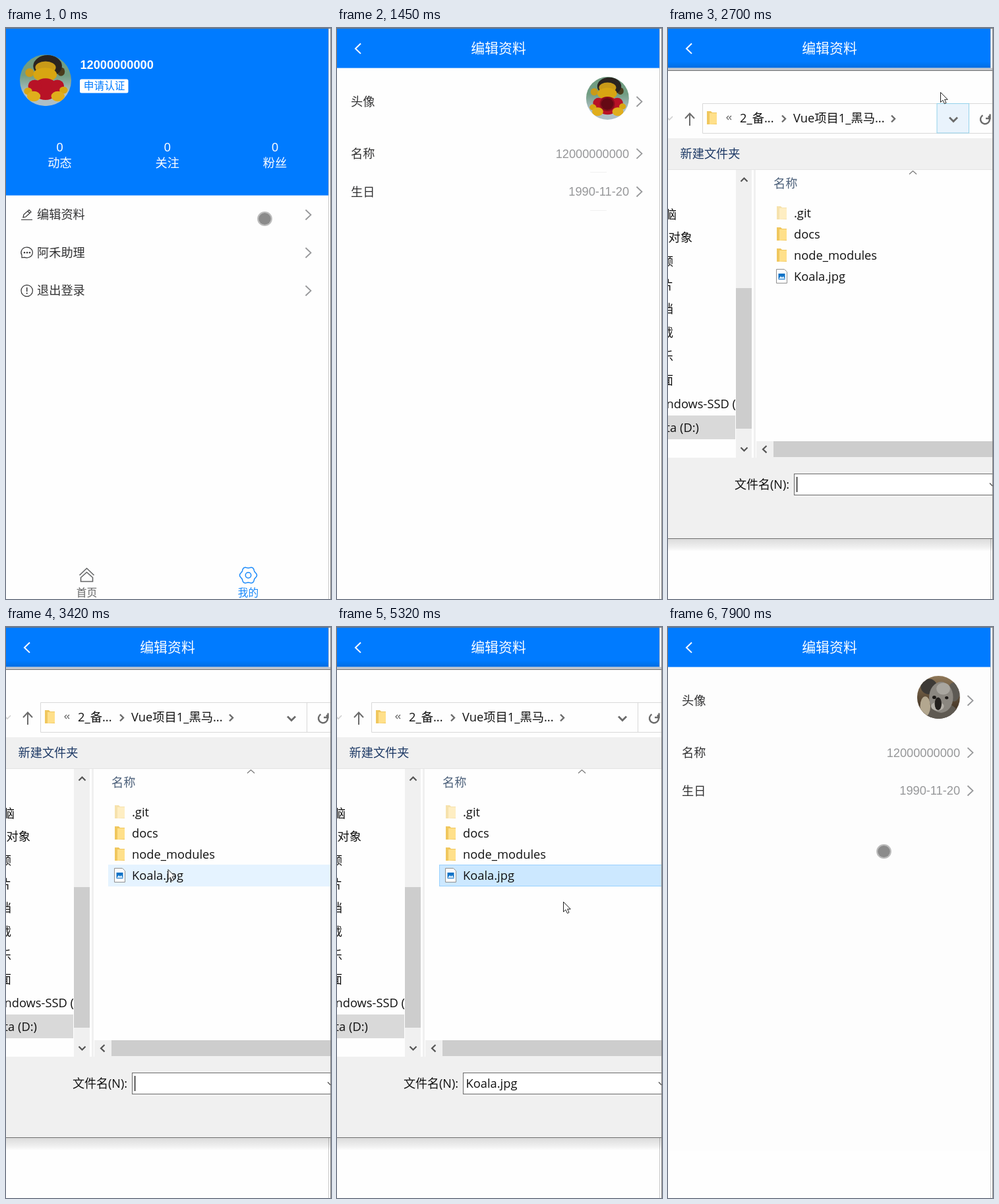
Recreate the animation shown at these times as an HTML page. Size 493x865 px, loop 8 s.

```html
<!DOCTYPE html>
<html lang="zh-CN">
<head>
<meta charset="utf-8">
<title>编辑资料</title>
<style>
html, body { margin: 0; width: 100%; height: 100%; overflow: hidden; background: #fefefe; }
svg { display: block; width: 493px; height: 865px; }
text { font-family: "Liberation Sans", "Noto Sans CJK SC", "Noto Sans CJK", sans-serif; font-size: 18.2px; fill: #323233; white-space: pre; }
.win text { font-family: "Open Sans", "Noto Sans CJK SC", "Noto Sans CJK", sans-serif; font-size: 18.3px; fill: #111; }
</style>
</head>
<body>
<svg id="stage" viewBox="0 0 493 865" xmlns="http://www.w3.org/2000/svg"></svg>
<script>
const LOOP = 8000;
const BLUE = '#007bff';

// markup helpers
const text = (x, y, s, style = '', anchor = 'start') =>
  `<text x="${x}" y="${y}" text-anchor="${anchor}" style="${style}">${s}</text>`;
const rect = (x, y, w, h, fill, extra = '') =>
  `<rect x="${x}" y="${y}" width="${w}" height="${h}" fill="${fill}" ${extra}/>`;
const line = (d, color, width = 1.5, extra = '') =>
  `<path d="${d}" fill="none" stroke="${color}" stroke-width="${width}" ${extra}/>`;
const oval = (x, y, rx, ry, fill) =>
  `<ellipse cx="${x}" cy="${y}" rx="${rx}" ry="${ry}" fill="${fill}"/>`;
const ring = (x, y, r, color, width = 1.3) =>
  `<circle cx="${x}" cy="${y}" r="${r}" fill="none" stroke="${color}" stroke-width="${width}"/>`;
const group = (id, body, extra = '') => `<g id="${id}" ${extra}>${body}</g>`;
const next = y => line(`M454.5 ${y - 7.5}l8 7.5l-8 7.5`, '#969799', 1.75);

// round photos, drawn in a unit circle
const photo = (x, y, r, body) =>
  `<g transform="translate(${x} ${y}) scale(${r})"><g clip-path="url(#round)">${body}</g></g>`;
const toy = (x, y, r) => photo(x, y, r,
  rect(-1, -1, 2, 2, 'url(#toyBg)') +
  oval(-.62, -.3, .17, .17, '#c99a18') + oval(.6, -.34, .15, .17, '#4a3c1c') +
  oval(.08, -.56, .56, .42, '#2a2420') +
  oval(0, -.5, .4, .24, '#c99a18') + oval(-.02, -.22, .46, .27, '#d8a612') +
  oval(0, .34, .5, .42, '#b81226') + oval(-.42, .22, .26, .24, '#b81226') + oval(.46, .22, .26, .24, '#b81226') +
  oval(-.68, .42, .16, .14, '#d8a612') + oval(.7, .38, .16, .14, '#d8a612') +
  oval(-.46, .62, .26, .2, '#e0ae1c') + oval(.48, .62, .26, .2, '#e0ae1c'));
const koala = (x, y, r) => photo(x, y, r,
  rect(-1, -1, 2, 2, 'url(#koalaBg)') +
  oval(-.45, -.5, .38, .36, '#3d3a36') + oval(.72, -.25, .28, .44, '#5d5a54') +
  oval(.1, .75, .8, .5, '#5f5a52') + oval(.12, 0, .56, .72, '#8b8780') +
  oval(.22, -.4, .32, .28, '#a9a69f') + oval(-.62, .42, .24, .46, '#b3a78f') +
  oval(-.05, .42, .3, .2, '#b5b1a9') + oval(-.2, 0, .09, .08, '#1d1a17') +
  oval(.38, .02, .08, .07, '#1d1a17') + oval(-.02, .3, .16, .3, '#23201d'));

const stat = (x, name) =>
  text(x, 187, '0', 'fill:#fff', 'middle') + text(x, 211, name, 'fill:#fff', 'middle');

function gear(cx, cy) {
  let d = '';
  for (let i = 0; i <= 96; i++) {
    const a = i / 96 * Math.PI * 2, r = 12 + Math.cos(6 * a);
    d += `${i ? 'L' : 'M'}${(cx + r * Math.cos(a)).toFixed(2)} ${(cy + r * Math.sin(a)).toFixed(2)}`;
  }
  return line(d + 'Z', '#1989fa', 1.5) + ring(cx, cy, 4.2, '#1989fa', 1.5);
}

const profile = rect(0, 0, 489, 253.6, BLUE) + toy(60, 79.3, 39) +
  text(112.5, 62, '12000000000', 'fill:#fff;font-weight:700') +
  rect(112, 77.5, 73.5, 21, '#fff', 'rx="2.5"') +
  text(117.8, 93.4, '申请认证', `fill:${BLUE};font-size:15.7px`) +
  stat(81.5, '动态') + stat(244.7, '关注') + stat(408, '粉丝') +
  line('M23 290.5H40M26 287l1-4.5l8-7l3 3.2l-8 7.3zM33 277.5l3 3', '#323233', 1.2) +
  line('M24 347.8V344A8.7 8 0 1 1 28 347.4Z', '#323233', 1.2) +
  [28, 32, 36].map(x => oval(x, 340.3, 1.2, 1.2, '#323233')).join('') +
  ring(31.7, 398, 8.7, '#323233', 1.2) + line('M31.7 393v6.5M31.7 401v2', '#323233', 1.5) +
  ['编辑资料', '阿禾助理', '退出登录'].map((s, i) =>
    text(47, 289.3 + 57.5 * i, s) + next(283 + 57.5 * i)).join('') +
  line('M111.5 829l11-10.5l11 10.5M113.5 838.5v-6l9-8l9 8v6z', '#646566', 1.6) +
  text(122.5, 860.5, '首页', 'fill:#646566;font-size:15.7px', 'middle') +
  gear(367.5, 829) +
  text(367.5, 860.5, '我的', 'fill:#1989fa;font-size:15.7px', 'middle');

const field = (y, name, value) =>
  text(21, y + 6.6, name) + text(443, y + 6.4, value, 'fill:#969799', 'end') + next(y);

const edit = rect(0, 0, 489, 60.6, BLUE) + line('M36 23.5l-8 7.7l8 7.7', '#fff', 2) +
  text(245, 38, '编辑资料', 'fill:#fff;font-size:20.9px;font-weight:500', 'middle') +
  group('after', rect(0, 61, 489, 733, '#fdfdfd')) +
  group('press', rect(0, 60.6, 489, 79.4, '#f2f3f5')) +
  group('trace', rect(384, 218, 25, 1, '#f1f1f1') + rect(384, 276, 25, 1, '#f1f1f1')) +
  field(111.5, '头像', '') + field(190.3, '名称', '12000000000') + field(248, '生日', '1990-11-20') +
  group('oldPic', toy(410.4, 106.5, 32.5)) + group('newPic', koala(410.4, 106.5, 32.5));

const folder = (x, y, alpha = 1) => `<g transform="translate(${x} ${y})" opacity="${alpha}">` +
  `<path d="M0 0h6l2 2h7v18h-15z" fill="#f0c75e"/><path d="M4 3h11v16l-11 1z" fill="#ffe08a"/></g>`;
const picture = (x, y) => `<g transform="translate(${x} ${y})">` +
  `<path d="M.5 .5h12l4 4v17h-16z" fill="#fff" stroke="#8f8f8f"/>` +
  rect(3.5, 7, 10, 9, '#1173c7') + `<path d="M4 15l3-4l2 2l2-2l2 4z" fill="#d8ecfb"/></g>`;

const places = ['此电脑', '3D 对象', '视频', '图片', '文档', '下载', '音乐', '桌面', 'Windows-SSD (', 'Data (D:)'];
const placeEnd = { 0: 13, 1: 37, 8: 103, 9: 47 };
const files = ['.git', 'docs', 'node_modules', 'Koala.jpg'];

const dialog =
  rect(0, 51, 489, 9.6, 'url(#fadeTop)') + rect(0, 60.6, 493, 4, '#c3c6cc') +
  rect(0, 774, 493, 19, 'url(#fadeBottom)') +
  rect(0, 64, 493, 710, '#6f6f6f') + rect(0, 65, 493, 708, '#fefefe') +
  // address bar
  line('M-3 134l5 5l5-5', '#cfcfcf', 1.6) + line('M33 148v-18M26 137l7-7.5l7 7.5', '#6b6b6b', 2) +
  line('M500 114.5H52.5V159.5H500M456.5 114.5V159.5', '#d9d9d9', 1) +
  folder(59, 126) + line('M92 133l-3 3l3 3M96 133l-3 3l3 3', '#666', 1.3) +
  text(109, 143, '2_备...') + line('M173 132.5l5 5l-5 5', '#6b6b6b', 2.4) +
  text(190, 143, 'Vue项目1_黑马...') + line('M339 132.5l5 5l-5 5', '#6b6b6b', 2.4) +
  group('drop', rect(408, 114.5, 48.5, 44.5, '#e9f3fc', 'stroke="#94d2ea"')) +
  line('M427 135.5l6 6l6-6', '#6b6b6b', 2.8) +
  line('M477.5 132.2A7 7 0 1 0 486 133.4M488.5 130.5v6.5h-6.5', '#6b6b6b', 2.4) +
  // command bar
  rect(0, 167, 493, 47, '#f0f0f0') + rect(0, 214, 493, 1, '#e4e4e4') +
  text(18.5, 196.5, '新建文件夹', 'fill:#1e3a66;font-size:18.2px') +
  // side list
  rect(0, 587, 102, 36, '#d9d9d9') +
  places.map((s, i) => text(placeEnd[i] ?? 8, 288.5 + 35.95 * i, s, '', 'end')).join('') +
  rect(103, 215, 24, 436, '#f0f0f0') + rect(103, 394, 24, 213, '#cdcdcd') +
  rect(130, 215, 3, 436, '#f0f0f0') +
  line('M110.5 232.5l5-5l5 5M110.5 635.5l5 5l5-5', '#555', 2.2) +
  // file list
  text(160, 242.3, '名称', 'fill:#4c607a;font-size:18.2px') + line('M366 221.5l5.5-5l5.5 5', '#777', 1.2) +
  group('hover', rect(155, 0, 338, 33, '#e5f3ff')) +
  group('chosen', rect(155.5, 360.5, 345, 32, '#cce8ff', 'stroke="#99d1ff"')) +
  files.map((s, i) => text(191, 287 + 32 * i, s) +
    (i < 3 ? folder(165, 270 + 32 * i, i ? 1 : .5) : picture(164, 365))).join('') +
  rect(134, 626, 359, 25, '#f0f0f0') + rect(160, 626, 333, 24, '#cdcdcd') +
  line('M149.5 633l-5.5 5.2l5.5 5.2', '#555', 2.2) +
  // footer
  rect(0, 651, 493, 122, '#f0f0f0') + text(184, 698, '文件名(N):', 'font-size:18px', 'end') +
  rect(191.5, 675.5, 310, 32, '#fff', 'stroke="#6a6a6a"') +
  line('M488 689.5l5 5', '#555', 1.4) +
  group('caret', rect(195, 680, 1.2, 23, '#000')) +
  group('fileName', text(195.5, 698, 'Koala.jpg'));

const stage = document.getElementById('stage');
stage.innerHTML = `<defs>
  <clipPath id="round"><circle r="1"/></clipPath>
  <linearGradient id="toyBg" x2="0" y2="1"><stop offset=".4" stop-color="#719d82"/><stop offset=".75" stop-color="#aebfc6"/></linearGradient>
  <linearGradient id="koalaBg" x2="0" y2="1"><stop stop-color="#8f7858"/><stop offset="1" stop-color="#2e2218"/></linearGradient>
  <linearGradient id="fadeTop" x2="0" y2="1"><stop stop-opacity="0"/><stop offset="1" stop-opacity=".12"/></linearGradient>
  <linearGradient id="fadeBottom" x2="0" y2="1"><stop stop-opacity=".14"/><stop offset=".7" stop-opacity=".05"/><stop offset="1" stop-opacity="0"/></linearGradient>
</defs>` +
  rect(0, 0, 493, 865, '#fefefe') +
  group('profile', profile) + group('edit', edit) +
  rect(489, 0, 1, 865, '#c9c9c9') +
  group('dialog', dialog, 'class="win"') +
  group('touch', oval(0, 0, 9.3, 9, 'rgba(0,0,0,.45)') +
    '<ellipse rx="10.3" ry="10" fill="none" stroke="#000" stroke-opacity=".26" stroke-width="2.2"/>') +
  group('arrow', '<path d="M.5 .5V15.5l3.4-3.2l2.5 5.4l2.6-1.2l-2.4-5.2h4.6z" fill="#fff" stroke="#222"/>') +
  rect(0, 0, 493, 1, '#777') + rect(492, 0, 1, 865, '#858585');

// pointer stops: time, x, y
const stops = [
  [0, 392.5, 289], [1060, 397, 274], [1180, 397, 220], [1310, 404, 150], [1450, 410, 115], [1600, 411, 113],
  [2160, 412, 116], [2560, 413, 110], [2700, 413, 97], [2850, 400, 160], [2980, 368, 245], [3120, 325, 303],
  [3270, 280, 336], [3420, 245.5, 367], [3830, 250, 362], [3970, 278, 318], [4110, 312, 258], [4250, 338, 204],
  [4390, 345, 226], [4530, 346, 272], [4660, 345, 320], [4810, 344, 360], [4940, 343, 390], [5070, 343, 408],
  [5320, 343, 416], [5470, 410, 530], [5620, 540, 720], [5740, 388, 508], [5860, 370, 450], [6000, 350, 390],
  [6150, 338.5, 361], [7900, 327.5, 340]
];

const el = id => document.getElementById(id);
const show = (id, on) => el(id).setAttribute('display', on ? 'inline' : 'none');
const move = (id, x, y) => el(id).setAttribute('transform', `translate(${x} ${y})`);

function render(t) {
  const within = (a, b) => t >= a && t < b;
  const [, x, y] = stops.filter(s => s[0] <= t).pop();
  const open = within(2160, 5620);
  const chosen = t >= 3690;
  const row = Math.floor((y - 264) / 32);

  show('profile', t < 500);
  show('edit', t >= 500);
  show('press', within(1880, 2160));
  show('trace', within(1310, 2160));
  show('after', t >= 5620);
  show('oldPic', t < 6990);
  show('newPic', t >= 6990);

  show('dialog', open);
  show('drop', within(2160, 2850));
  show('hover', x >= 155 && row >= 0 && row < 4);
  move('hover', 0, 264 + 32 * row);
  show('chosen', chosen);
  show('fileName', chosen);
  show('caret', !chosen && !within(2850, 3270));

  show('touch', !open);
  show('arrow', open);
  move('touch', x, y);
  move('arrow', x, y);
}

const start = performance.now();
function tick() {
  render((performance.now() - start) % LOOP);
  requestAnimationFrame(tick);
}
tick();
</script>
</body>
</html>
```
